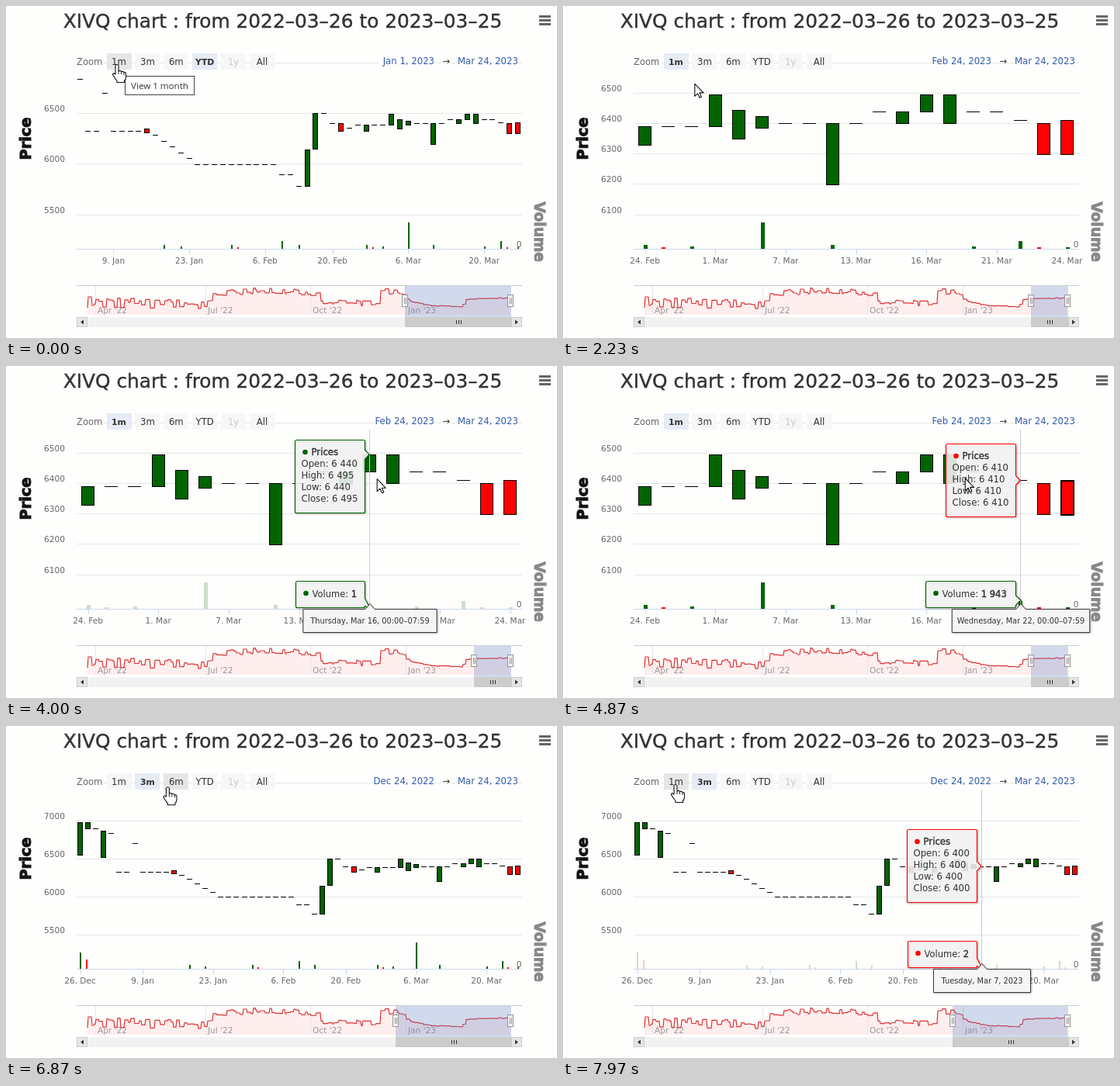
Write an HTML page that moves like this. It is 710 by 428 pixels and loops after 8000 ms.

```html
<!DOCTYPE html>
<html lang="en">
<head>
<meta charset="utf-8">
<title>Stock chart</title>
<style>
html, body { margin: 0; width: 100%; height: 100%; overflow: hidden; background: #fefefd; }
svg { display: block; font-family: "DejaVu Sans", sans-serif; }
text { white-space: pre; fill: #333; }
rect { shape-rendering: crispEdges; }
.label { fill: #666; }
.input { fill: #335cad; }
.strong { stroke: #333; stroke-width: .4px; }
.tip { filter: drop-shadow(1px 1px 1px rgba(0, 0, 0, .3)); }
</style>
</head>
<body>
<svg width="710" height="428" viewBox="0 0 710 428">
  <g id="back"></g>
  <g id="live"></g>
</svg>
<script>
const LOOP = 8000, SWITCH = 500;
const PAPER = '#fefefd', GRID = '#e6e6e6', AXIS = '#ccd6eb', GREEN = '#006400', RED = '#ff0000';
const LAST = 56, LEFT = 91, WIDTH = 574, PRICE_BASE = 269, PRICE_TOP = 73, VOL_BASE = 313;
const DAY = 864e5;

const lerp = (a, b, p) => a + (b - a) * p;
const clamp = (v, lo, hi) => Math.max(lo, Math.min(hi, v));
const ease = p => (1 - Math.cos(Math.PI * clamp(p, 0, 1))) / 2;
const days = Array.from({ length: LAST + 1 }, (_, i) => i);

// Linear interpolation along keys [position, value, ...].
function along(keys, at, column = 1) {
  const i = clamp(keys.findIndex(k => k[0] >= at), 1, keys.length - 1);
  const [a, b] = [keys[i - 1], keys[i]];
  return lerp(a[column], b[column], clamp((at - a[0]) / (b[0] - a[0]), 0, 1));
}

// Closing prices by key days; days with a body open that far below (or above) the close.
const closeKeys = [[0, 6980], [1, 6980], [2, 6900], [4, 6840], [5, 6330], [6, 6330], [7, 6700], [8, 6330],
  [11, 6330], [13, 6290], [18, 6000], [27, 6000], [28, 5900], [29, 5900], [30, 5780], [32, 6500],
  [33, 6500], [34, 6400], [35, 6330], [37, 6390], [40, 6390], [41, 6495], [42, 6445], [44, 6400],
  [47, 6400], [48, 6440], [49, 6440], [50, 6495], [51, 6495], [52, 6440], [53, 6440], [54, 6410], [55, 6300], [56, 6300]];
const bodies = { 0: 430, 1: 80, 3: 350, 12: -40, 31: 360, 32: 350, 35: -70, 38: 60, 41: 105, 42: 95,
  43: 40, 46: 200, 49: 40, 50: 55, 51: 95, 55: -100, 56: -110 };
const prices = days.map(i => {
  const close = Math.round(along(closeKeys, i) / 5) * 5;
  return [close - (bodies[i] || 0), close];
});

// Volume bar height; negative on a falling day.
const peaks = { 0: 21, 1: -12, 28: 10, 43: 34, 54: 10 };
const volume = i => peaks[i] || (i < 10 ? 0 : i % 8 === 6 ? 5 : i % 12 === 4 ? 3 : i % 16 === 7 ? -2 : i === LAST ? 2 : 0);

// Trading days counted back from the end, without weekends and some Fridays.
const closed = ['03-10', '03-03', '02-17', '02-10', '01-27', '01-13', '01-06', '12-30'];
const dates = [];
for (let d = Date.UTC(2023, 2, 24); dates.length <= LAST; d -= DAY) {
  const date = new Date(d);
  if (date.getUTCDay() % 6 && !closed.includes(date.toISOString().slice(5, 10))) dates.unshift(date);
}
const datePart = (i, options) => dates[i].toLocaleDateString('en-US', { timeZone: 'UTC', ...options });
const shortDate = i => `${dates[i].getUTCDate()}. ${datePart(i, { month: 'short' })}`;
const fortnightly = i => (Date.UTC(2023, 2, 20) - dates[i]) % (14 * DAY) === 0;
const everyThird = i => (LAST - i) % 3 === 0;

const views = [
  { at: 0, button: 'YTD', first: 4, x0: 95, x1: 659.5, lo: 5500, hi: 7000, step: 500,
    named: fortnightly, nav: 514, from: 'Jan 1, 2023', bar: 7, vol: 2 },
  { at: 1030, button: '1m', first: 38, x0: 105.5, x1: 649.5, lo: 6100, hi: 6600, step: 100,
    named: everyThird, nav: 603, from: 'Feb 24, 2023', bar: 17, vol: 5 },
  { at: 6070, button: '3m', first: 0, x0: 95.5, x1: 659.5, lo: 5500, hi: 7500, step: 500,
    named: fortnightly, nav: 502, from: 'Dec 24, 2022', bar: 7, vol: 2 }
];
for (const v of views) {
  v.gap = (v.x1 - v.x0) / (LAST - v.first);
  v.days = days.filter(i => i >= v.first && v.named(i));
  v.ticks = [];
  for (let price = v.lo; price <= v.hi; price += v.step) v.ticks.push(price);
}
const dayX = (v, i) => v.x1 - (LAST - i) * v.gap;
const priceY = (v, price) => lerp(PRICE_BASE, PRICE_TOP, (price - v.lo) / (v.hi - v.lo));

const buttons = ['1m', '3m', '6m', 'YTD', '1y', 'All'];
const buttonX = i => 145.5 + 36.9 * i;

// Pointer: time, x, y.
const path = [[0, 143, 76], [1900, 145, 76], [2500, 190, 120], [3070, 219, 142], [4600, 645, 148],
  [4790, 640, 147], [4870, 519, 145], [5300, 230, 80], [5600, 180, 75], [6300, 182, 75],
  [6870, 208, 79], [7600, 500, 200], [7970, 545, 216]];
const pointer = t => [along(path, t, 1), along(path, t, 2)];
const hovers = [[2250, 5150], [7080, 9000]];
const HOVER_LAG = 45, HIGHLIGHT_LAG = 100, LINGER = 600;
const nearestDay = (v, t) => clamp(Math.round(LAST - (v.x1 - pointer(t)[0]) / v.gap), v.first, LAST);

const rect = (x, y, w, h, fill, more = '') =>
  `<rect x="${x}" y="${y}" width="${w}" height="${h}" fill="${fill}" ${more}/>`;
const text = (x, y, s, size = 11.7, anchor = 'start', more = '') =>
  `<text x="${x}" y="${y}" font-size="${size}" text-anchor="${anchor}" ${more}>${s}</text>`;
const shape = (d, fill, stroke, more = '') => `<path d="${d}" fill="${fill}" stroke="${stroke}" ${more}/>`;

function navigatorLine() {
  const trend = [[105, 382], [258, 384], [264, 372], [312, 367], [402, 370], [408, 380], [478, 384],
    [484, 365], [511, 373], [518, 380], [545, 386], [588, 388], [591, 378], [651, 376]];
  let seed = 5, d = 'M105 389';
  const random = () => (seed = seed * 16807 % 2147483647) / 2147483647;
  for (let x = 106; x < 650;) {
    const rough = x < 262 ? 14 : x < 514 ? 8 : 1;
    const y = along(trend, x) + (random() - .5) * rough;
    d += `L${x} ${y.toFixed(1)}`;
    x += 2 + Math.round(random() * 5);
    d += `H${Math.min(651, x - 1)}`;
  }
  return d;
}

function drawBack() {
  const line = navigatorLine();
  const quarter = ([x, s]) => rect(x, 361, 1, 37, GRID) + text(x + 3, 396, s, 10.6, 'start', 'style="fill:#999"');
  const arrow = (x, dir) => rect(x, 401.5, 13, 12, '#e6e6e6', 'stroke="#ccc"') +
    shape(`M${x + 6.5 + 2 * dir} 407.5l${-4 * dir} -3v6z`, '#333', 'none');
  const axisTitle = (x, y, turn, s, size, colour) => text(0, 0, s, size, 'middle',
    `transform="translate(${x} ${y}) rotate(${turn})" font-weight="bold" style="fill:${colour};stroke:${colour}"`);
  document.getElementById('back').innerHTML =
    text(356.5, 27.5, 'XIVQ chart : from 2022–03–26 to 2023–03–25', 24.8, 'middle', 'class="strong"') +
    [12, 17, 22].map(y => rect(687, y, 15, 3, '#666')).join('') +
    axisTitle(32, 171, -90, 'Price', 19.3, '#111') +
    axisTitle(681, 291, 90, 'Volume', 18.6, '#888') +
    shape(line + 'V398H105Z', '#ffeeee', 'none') +
    rect(LEFT, 360, WIDTH, 1, '#ccc') +
    [[115, "Apr '22"], [257, "Jul '22"], [392, "Oct '22"], [515, "Jan '23"]].map(quarter).join('') +
    shape(line, 'none', '#dd3333', 'stroke-width="1.2"') +
    rect(LEFT, 401, WIDTH, 13, '#f2f2f2') + arrow(91.5, -1) + arrow(651.5, 1) +
    rect(LEFT, PRICE_BASE, WIDTH, 1, GRID) + rect(LEFT, VOL_BASE, WIDTH, 1, AXIS) +
    text(661, 311, '0', 10.6, 'middle', 'class="label"');
}

function drawAxes(now, old, p) {
  const y = price => lerp(priceY(old, price), priceY(now, price), p);
  const x = i => lerp(dayX(old, i), dayX(now, i), p);
  const blend = (a, b, draw) => [...new Set([...a, ...b])].map(key => {
    const alpha = a.includes(key) && b.includes(key) ? 1 : b.includes(key) ? p : 1 - p;
    return alpha > .01 ? `<g opacity="${alpha.toFixed(3)}">${draw(key)}</g>` : '';
  }).join('');
  return blend(old.ticks, now.ticks, price => rect(LEFT, Math.round(y(price) - .5), WIDTH, 1, GRID)) +
    blend(old.ticks.slice(0, -1), now.ticks.slice(0, -1), price =>
      text(76, y(price) - 2.5, price, 10.6, 'end', 'class="label"')) +
    blend(old.days, now.days, i => rect(Math.round(x(i)), 314, 1, 6, AXIS) +
      text(x(i), 331.5, shortDate(i), 10.5, 'middle', 'class="label"'));
}

function drawSeries(v, marked, dim) {
  let bars = '', candles = '';
  for (let i = v.first; i <= LAST; i++) {
    const x = dayX(v, i), [open, close] = prices[i], vol = volume(i), h = Math.abs(vol);
    const top = Math.round(priceY(v, Math.max(open, close)));
    const height = Math.round(priceY(v, Math.min(open, close))) - top;
    const left = Math.round(x - v.bar / 2);
    candles += height
      ? rect(left + .5, top + .5, v.bar - 1, height, close > open ? GREEN : RED,
          `stroke="#000" stroke-width="${i === marked ? 2 : 1}"`)
      : rect(left, top, v.bar, 1, '#000');
    const shift = vol < 0 ? -.2 * v.gap : .5;
    if (h) bars += rect(Math.round(x + shift - v.vol / 2), VOL_BASE - h, v.vol, h, vol < 0 ? RED : GREEN);
  }
  return `<g opacity="${dim ? .2 : 1}">${bars}</g>${candles}`;
}

// Box whose right side points at (x, y).
function bubble(l, t, r, b, x, y, colour) {
  const y1 = clamp(y - 6, t + 4, b - 12), y2 = clamp(y + 6, t + 14, b - 2);
  return shape(`M${l + 2} ${t}H${r - 2}Q${r} ${t} ${r} ${t + 2}V${y1}L${x} ${y}L${r} ${y2}V${b - 2}` +
    `Q${r} ${b} ${r - 2} ${b}H${l + 2}Q${l} ${b} ${l} ${b - 2}V${t + 2}Q${l} ${t} ${l + 2} ${t}Z`,
    'rgba(250,250,250,.87)', colour, 'stroke-width="1.2" class="tip"');
}

function drawTooltips(v, i) {
  const x = Math.round(dayX(v, i)), [open, close] = prices[i], r = x - 5.5;
  const spaced = n => String(n).replace(/\B(?=(\d{3})+$)/g, ' ');
  const bullet = (l, y, colour) => `<circle cx="${l + 13}" cy="${y}" r="3.3" fill="${colour}"/>`;

  const colour = close > open ? GREEN : RED, y = priceY(v, close), l = r - 90;
  const top = Math.round(clamp(y - 47.5, 95, 176)) + .5;
  const rows = [['Open', open], ['High', Math.max(open, close)], ['Low', Math.min(open, close)], ['Close', close]];
  const priceTip = bubble(l, top, r, top + 94, x, y, colour) + bullet(l, top + 15.5, colour) +
    text(l + 21, top + 19.5, 'Prices', 11.7, 'start', 'class="strong"') +
    rows.map(([name, n], k) => text(l + 8, top + 34.5 + k * 14.9, `${name}: ${spaced(n)}`)).join('');

  const vol = volume(i), h = Math.abs(vol);
  const amount = spaced(h ? Math.round(h * 194.3) : (2 * i + 5) % 13);
  const volColour = vol > 0 || (!vol && close > open) ? GREEN : RED;
  const vl = Math.round(r - 83.3 - 6.7 * amount.length) + .5;
  const volumeTip = bubble(vl, 277.5, r, 311.5, x + 1, VOL_BASE - h - 1, volColour) +
    bullet(vl, 293, volColour) +
    text(vl + 21, 297.5, `Volume: <tspan class="strong">${amount}</tspan>`, 11.5);

  const date = `${datePart(i, { weekday: 'long' })}, ${datePart(i, { month: 'short', day: 'numeric' })}, ` +
    (v.step === 100 ? '00:00–07:59' : '2023');
  const half = (20 + 5.25 * date.length) / 2, c = x + 1;
  const dateTip = shape(`M${c - half} 313.5H${c - 6}L${c} 306.5L${c + 6} 313.5H${c + half}V343.5H${c - half}Z`,
    'rgba(250,250,250,.93)', '#333', 'class="tip"') + text(c, 332, date, 9.8, 'middle');

  return rect(x, 82, 1, VOL_BASE - 82, '#ccc') + priceTip + volumeTip + dateTip;
}

function drawSelector(v, shift, over) {
  const cell = (label, i) => {
    const selected = label === v.button, disabled = label === '1y';
    const fill = selected ? '#e6ebf5' : i === over && !disabled ? '#e6e6e6' : '#f7f7f7';
    const more = selected ? 'font-weight="bold"' : disabled ? 'style="fill:#ccc"' : '';
    return rect(Math.round(buttonX(i) - 16), 61, 32, 21, fill) +
      text(buttonX(i), 76, label, selected ? 10.8 : 11.7, 'middle', more);
  };
  const cover = (x, w) => rect(x, 64, w, 14, PAPER);
  const fromWidth = v.from.length * 6.45;
  return cover(LEFT, 35) + text(LEFT, 76, 'Zoom', 11.5, 'start', 'class="label"') + buttons.map(cell).join('') +
    cover(552 - fromWidth, fromWidth) + cover(582, 79) +
    text(552 + shift, 75, v.from, 11.7, 'end', 'class="input"') +
    text(567.5 + shift, 75, '→', 11.7, 'middle') +
    text(582 + shift, 75, 'Mar 24, 2023', 11.7, 'start', 'class="input"');
}

function drawNavigator(left) {
  const mid = Math.round((left + 651) / 2);
  const handle = x => rect(x - 3.5, 372.5, 7, 15, '#f2f2f2', 'stroke="#999"') +
    [-1.5, .5].map(dx => rect(x + dx, 376, 1, 8, '#999')).join('');
  return rect(left, 361, 651 - left, 40, 'rgba(102,133,194,.3)') +
    rect(left + .5, 401.5, 650 - left, 12, '#ccc', 'stroke="#ccc"') +
    [-3, 0, 3].map(dx => rect(mid + dx, 405, 1, 5, '#333')).join('') +
    handle(Math.round(left)) + handle(650);
}

function drawPointer([x, y], overButton) {
  const hand = 'M-2 1Q0 -2 2 1V8Q4 6.5 5.5 8.5Q7.5 7.3 9 9.5Q11.5 9 11.5 11.5V16Q11.5 18.5 9.5 20.5V22.5H0V20.5Q-3 17 -5.5 12.5Q-5.5 9.5 -2 12Z';
  const arrow = 'M0 0V16L3.8 12.5L6.3 18L8.6 17L6.2 11.6H11.2Z';
  return `<g transform="translate(${x.toFixed(1)} ${y.toFixed(1)})">` +
    shape(overButton ? hand : arrow, '#fff', '#111', 'stroke-width="1.1" stroke-linejoin="round"') +
    (overButton ? shape('M2 8V12M5.5 9V12M9 10V13', 'none', '#222') : '') + '</g>';
}

function draw(t) {
  const n = views.findLastIndex(v => t >= v.at);
  const now = views[n], old = views[Math.max(0, n - 1)];
  const p = n ? ease((t - now.at) / SWITCH) : 1;
  const tip = pointer(t);
  const over = tip[1] < 83 ? buttons.findIndex((_, i) => Math.abs(tip[0] - buttonX(i)) < 16) : -1;

  const hover = hovers.find(([a, b]) => t >= a && t < b + LINGER);
  const inside = hover && t < hover[1];
  const hoverTime = hover && Math.min(t, hover[1]);
  const fade = hover ? clamp((hover[1] + LINGER - t) / 150, 0, 1) : 0;
  const marked = inside ? nearestDay(now, t - HIGHLIGHT_LAG) : -1;
  const leaving = t > 4740 && t < 5150;

  document.getElementById('live').innerHTML =
    drawAxes(now, old, p) +
    drawSeries(now, marked, inside && !leaving) +
    drawNavigator(lerp(old.nav, now.nav, p)) +
    drawSelector(now, p < 1 ? 1.5 : 0, over) +
    (hover ? `<g opacity="${fade}">${drawTooltips(now, nearestDay(now, hoverTime - HOVER_LAG))}</g>` : '') +
    (t < 1000 ? rect(153.5, 90.5, 89, 24, '#fff', 'stroke="#444"') +
      text(198, 107, 'View 1 month', 11.6, 'middle', 'style="font-family:\'Open Sans\',sans-serif"') : '') +
    drawPointer(tip, over >= 0);
}

drawBack();
const start = performance.now();
(function tick() {
  draw((performance.now() - start) % LOOP);
  requestAnimationFrame(tick);
})();
</script>
</body>
</html>
```
